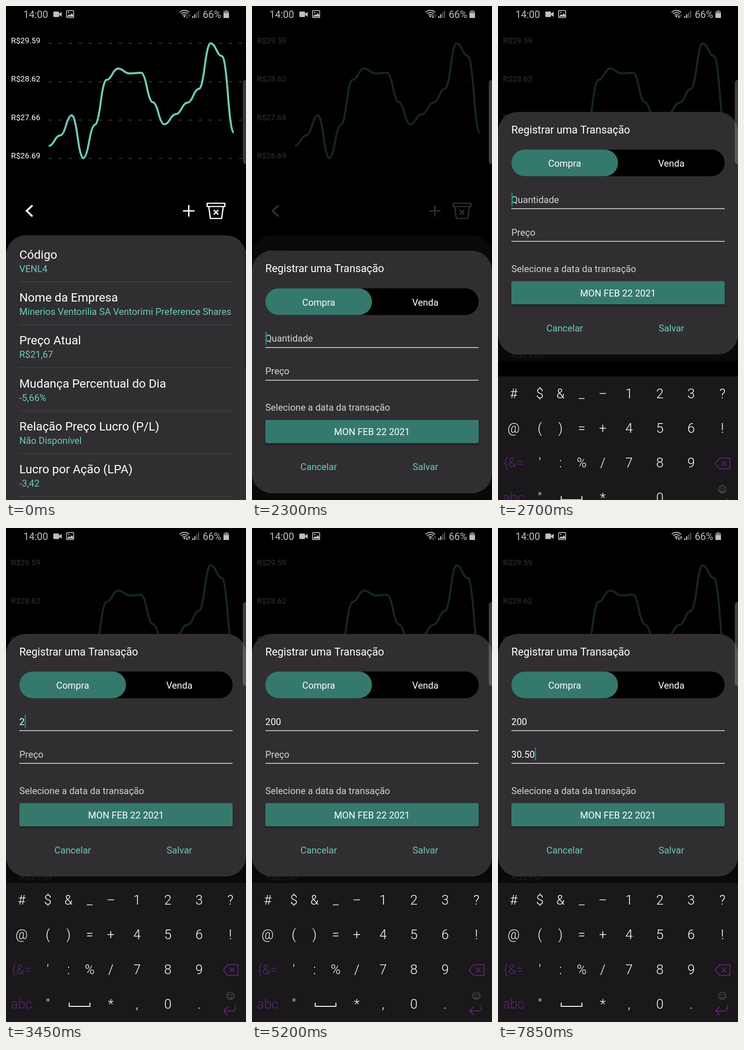
Write an HTML page with a canvas that moves like this. It is 522 px wide and 1073 px high and loops after 8000 ms.

```html
<!DOCTYPE html>
<html lang="pt-BR">
<head>
<meta charset="utf-8">
<title>Registrar uma Transação</title>
<style>
html, body { margin: 0; width: 100%; height: 100%; overflow: hidden; background: #000; }
canvas { display: block; width: 522px; height: 1073px; }
</style>
</head>
<body>
<canvas id="stage" width="522" height="1073"></canvas>
<script>
const ctx = document.getElementById('stage').getContext('2d');
const LOOP = 8000, DP = 1.45, LEFT = 29, RIGHT = 493, KEY_TOP = 771;
const PANEL = '#302e31', TEAL = '#35796d', MINT = '#6fc9ba', ICON = '#c0c0c0', PURPLE = '#5f2474';

function text(str, x, y, size, color, align = 'left', weight = 400) {
  ctx.font = `${weight} ${size}px Roboto, sans-serif`;
  ctx.textAlign = align;
  ctx.fillStyle = color;
  ctx.fillText(str, x, y);
}

function box(x, y, w, h, color, radius = 0) {
  ctx.fillStyle = color;
  ctx.beginPath();
  ctx.roundRect(x, y, w, h, radius);
  ctx.fill();
}

function stroke(color, width) {
  ctx.strokeStyle = color;
  ctx.lineWidth = width;
  ctx.stroke();
}

function line(points, color, width, closed = false) {
  ctx.beginPath();
  points.forEach(([x, y]) => ctx.lineTo(x, y));
  if (closed) ctx.closePath();
  stroke(color, width);
}

function cross(x, y, r, color, width) {
  line([[x - r, y - r], [x + r, y + r]], color, width);
  line([[x + r, y - r], [x - r, y + r]], color, width);
}

const within = (t, from, to) => t >= from && t < to;
const latest = (steps, t) => steps.reduce((value, [at, next]) => t >= at ? next : value, '');

// Status bar

const upActive = t => within(t, 50, 1150) || within(t, 3150, 4200) || t >= 7250;
const downActive = t => within(t, 50, 5200) || t >= 7250;

function arrow(x, dir, active) {
  const color = active ? ICON : '#555';
  const tip = 22 + dir * 3.5;
  line([[x, 22 - dir * 3.5], [x, tip]], color, 1.4);
  line([[x - 2.2, tip - dir * 2.5], [x, tip], [x + 2.2, tip - dir * 2.5]], color, 1.3);
}

function statusBar(t) {
  text('14:00', 38, 25.5, 21.5, ICON);
  box(103, 12, 12.5, 12, ICON, 2);
  ctx.beginPath();
  [[114, 18], [121, 12.5], [121, 23.5]].forEach(p => ctx.lineTo(...p));
  ctx.fill();

  ctx.beginPath();
  ctx.roundRect(131.8, 9.8, 15.4, 15.4, 2);
  stroke(ICON, 1.8);
  box(135, 12.5, 3, 3, ICON, 1.5);
  ctx.beginPath();
  [[133, 23], [137, 17.5], [139.5, 20], [143, 15.5], [146.5, 20], [146.5, 23]].forEach(p => ctx.lineTo(...p));
  ctx.fill();

  for (const r of [5, 9.5, 14]) {
    ctx.beginPath();
    ctx.arc(388, 23.5, r, -Math.PI * 0.76, -Math.PI * 0.24);
    stroke(ICON, 2);
  }
  box(386, 20.5, 4, 4, ICON, 2);
  arrow(393.5, 1, downActive(t));
  arrow(398.3, -1, upActive(t));

  for (let i = 0; i < 4; i++) {
    const h = 4 + i * 4;
    box(405 + i * 4.2, 26 - h, 2.5, h, i < 2 ? ICON : '#5a5a5a');
  }
  text('66%', 428, 25.5, 21.5, ICON);
  box(476.5, 9, 5, 3, '#777');
  box(473, 11, 12, 15, '#777', 1);
  box(473, 15.5, 12, 10.5, ICON, 1);
}

// Stock page

const prices = [304, 281, 237.5, 330.5, 258, 160.5, 136, 146.5, 145, 209, 257, 235, 210, 180, 81, 109, 275];
const details = [
  ['Código', 'VENL4'],
  ['Nome da Empresa', 'Minerios Ventorilia SA Ventorimi Preference Shares'],
  ['Preço Atual', 'R$21,67'],
  ['Mudança Percentual do Dia', '-5,66%'],
  ['Relação Preço Lucro (P/L)', 'Não Disponível'],
  ['Lucro por Ação (LPA)', '-3,42'],
];

function chart() {
  ['29.59', '28.62', '27.66', '26.69'].forEach((price, i) => {
    const y = 81 + i * 83.4;
    text('R$' + price, 11, y, 17.3, '#fff');
    ctx.setLineDash([5 * DP, 10 * DP]);
    line([[92.8, y], [522, y]], '#484848', DP);
    ctx.setLineDash([]);
  });

  const xAt = i => 92.8 + i * 25.15;
  ctx.beginPath();
  ctx.moveTo(xAt(0), prices[0]);
  for (let i = 0; i < prices.length - 1; i++) {
    const x0 = xAt(i), x1 = xAt(i + 1), mid = (x0 + x1) / 2;
    const y0 = prices[i], y1 = prices[i + 1];
    ctx.quadraticCurveTo((x0 + mid) / 2, y0, mid, (y0 + y1) / 2);
    ctx.quadraticCurveTo((x1 + mid) / 2, y1, x1, y1);
  }
  stroke(MINT, 3 * DP);
}

function toolbar() {
  line([[57.5, 433], [45, 445], [57.5, 457]], '#fff', 4);
  line([[385, 445], [410, 445]], '#fff', 3);
  line([[397.5, 432.5], [397.5, 457.5]], '#fff', 3);
  ctx.lineJoin = 'round';
  line([[437.5, 428.5], [476, 428.5], [476, 435.5], [437.5, 435.5]], '#fff', 2.7, true);
  line([[441, 436], [444.5, 461.5], [469, 461.5], [472.5, 436]], '#fff', 2.7);
  ctx.lineJoin = 'miter';
  cross(456.8, 448, 5, '#fff', 2.7);
}

function page() {
  chart();
  toolbar();
  box(0, 498, 522, 620, PANEL, 30 * DP);
  box(517, 530, 5, 255, '#2a282b');
  details.forEach(([label, value], i) => {
    const y = i * 93.2;
    text(label, LEFT, 549 + y, 26.1, '#fff');
    text(value, LEFT, 578 + y, 20.3, MINT);
    line([[LEFT, 599.3 + y], [RIGHT, 599.3 + y]], '#444246', DP);
  });
}

// Transaction form

const quantity = [[3400, '2'], [3850, '20'], [4000, '200']];
const price = [[5800, '3'], [6250, '30'], [6750, '30.'], [7300, '30.5'], [7700, '30.50']];

const quantityCursor = t => within(t, 2300, 2800) || within(t, 3300, 4550);
const priceCursor = t => within(t, 4700, 5200) || within(t, 5700, 7250) || t >= 7300;

function field(hint, value, baseline, cursorOn) {
  text(value || hint, LEFT, baseline, 20.3, value ? '#fff' : '#d4d3d4');
  line([[LEFT, baseline + 12.7], [RIGHT, baseline + 12.7]], '#eee', DP);
  if (cursorOn) {
    box(LEFT + ctx.measureText(value).width, baseline - 21.5, 2.9, 28, '#0b8f7b');
  }
}

function form(t) {
  box(0, 531.5, 522, 527, PANEL, 30 * DP);
  text('Registrar uma Transação', LEFT, 578, 23.2, '#fff');

  box(LEFT, 613.3, 464, 58, '#000', 29);
  box(LEFT, 613.3, 232, 58, TEAL, 29);
  text('Compra', 145, 650.5, 20.3, '#fff', 'center');
  text('Venda', 377, 650.5, 20.3, '#fff', 'center');

  field('Quantidade', latest(quantity, t), 729, quantityCursor(t));
  field('Preço', latest(price, t), 800, priceCursor(t));

  text('Selecione a data da transação', LEFT, 879, 20.3, '#d4d3d4');
  ctx.save();
  ctx.shadowColor = 'rgba(0,0,0,.4)';
  ctx.shadowBlur = 5;
  ctx.shadowOffsetY = 2.5;
  box(LEFT, 899, 464, 50.5, TEAL, 3);
  ctx.restore();
  text('MON FEB 22 2021', 261, 932, 20.3, '#fff', 'center');
  text('Cancelar', 145, 1008, 20.3, MINT, 'center');
  text('Salvar', 377, 1008, 20.3, MINT, 'center');
}

// Keyboard

const columns = [34, 91, 136, 182, 228, 285, 352, 420, 488];
const keyRows = [
  ['#', '$', '&', '_', '–', '1', '2', '3', '?'],
  ['@', '(', ')', '=', '+', '4', '5', '6', '!'],
  ['{&=', "'", ':', '%', '/', '7', '8', '9', ''],
  ['abc', '"', '', '', '*', ',', '0', '.', ''],
];
const presses = [
  [3350, 3450, '2'], [3800, 3850, '0'], [3950, 4000, '0'], [5750, 5800, '3'],
  [6150, 6250, '0'], [6700, 6750, '.'], [7200, 7300, '5'], [7650, 7700, '0'],
];

function keyboard(t) {
  box(0, KEY_TOP, 522, 302, '#1a181b');
  const press = presses.find(([from, to]) => within(t, from, to));
  keyRows.forEach((row, r) => row.forEach((key, c) => {
    if (press && press[2] === key) {
      box(columns[c] - 34, KEY_TOP + r * 75.5, 68, 75.5, '#000', 6);
    }
    text(key, columns[c], 818 + r * 75.4, 29, key.length > 1 ? PURPLE : '#fff', 'center', 300);
  }));

  line([[137.5, 1031], [137.5, 1039], [182.5, 1039], [182.5, 1031]], '#fff', 2);

  ctx.lineJoin = 'round';
  line([[472.5, 960], [482, 948.5], [504.5, 948.5], [504.5, 971.5], [482, 971.5]], PURPLE, 2, true);
  cross(492, 960, 5, PURPLE, 2);

  ctx.beginPath();
  ctx.moveTo(499, 1036);
  ctx.lineTo(499, 1042);
  ctx.quadraticCurveTo(499, 1049, 492, 1049);
  ctx.lineTo(474, 1049);
  stroke(PURPLE, 2);
  line([[482, 1040], [473.5, 1049], [482, 1058]], PURPLE, 2);
  ctx.lineJoin = 'miter';

  const grey = '#69676a';
  ctx.beginPath();
  ctx.arc(488, 1016, 8, 0, Math.PI * 2);
  stroke(grey, 1.2);
  ctx.beginPath();
  ctx.arc(488, 1016.5, 4.5, 0.3, Math.PI - 0.3);
  stroke(grey, 1.2);
  box(484.3, 1012.5, 2, 2.5, grey, 1);
  box(489.7, 1012.5, 2, 2.5, grey, 1);
}

function draw(t) {
  box(0, 0, 522, 1073, '#000');
  page();
  const typing = t >= 2500;
  if (t >= 550) {
    ctx.save();
    ctx.globalAlpha = t < 600 ? 0.5 : 1;
    box(0, 40, 522, 1033, 'rgba(0,0,0,.81)');
    if (typing) ctx.translate(0, -301.5);
    form(t);
    ctx.restore();
  }
  if (typing) {
    box(0, KEY_TOP, 522, 302, '#000');
    const remaining = 1 - Math.min(1, (t - 2500) / 300);
    ctx.save();
    ctx.translate(0, 302 * remaining * remaining);
    keyboard(t);
    ctx.restore();
  }
  statusBar(t);
  box(515, 161, 12, 182, t < 550 ? 'rgba(140,140,140,.4)' : 'rgba(150,150,150,.42)', 6);
}

function tick() {
  const t = performance.now() % LOOP;
  draw(Math.floor(t / 50) * 50);
  requestAnimationFrame(tick);
}
tick();
</script>
</body>
</html>
```
